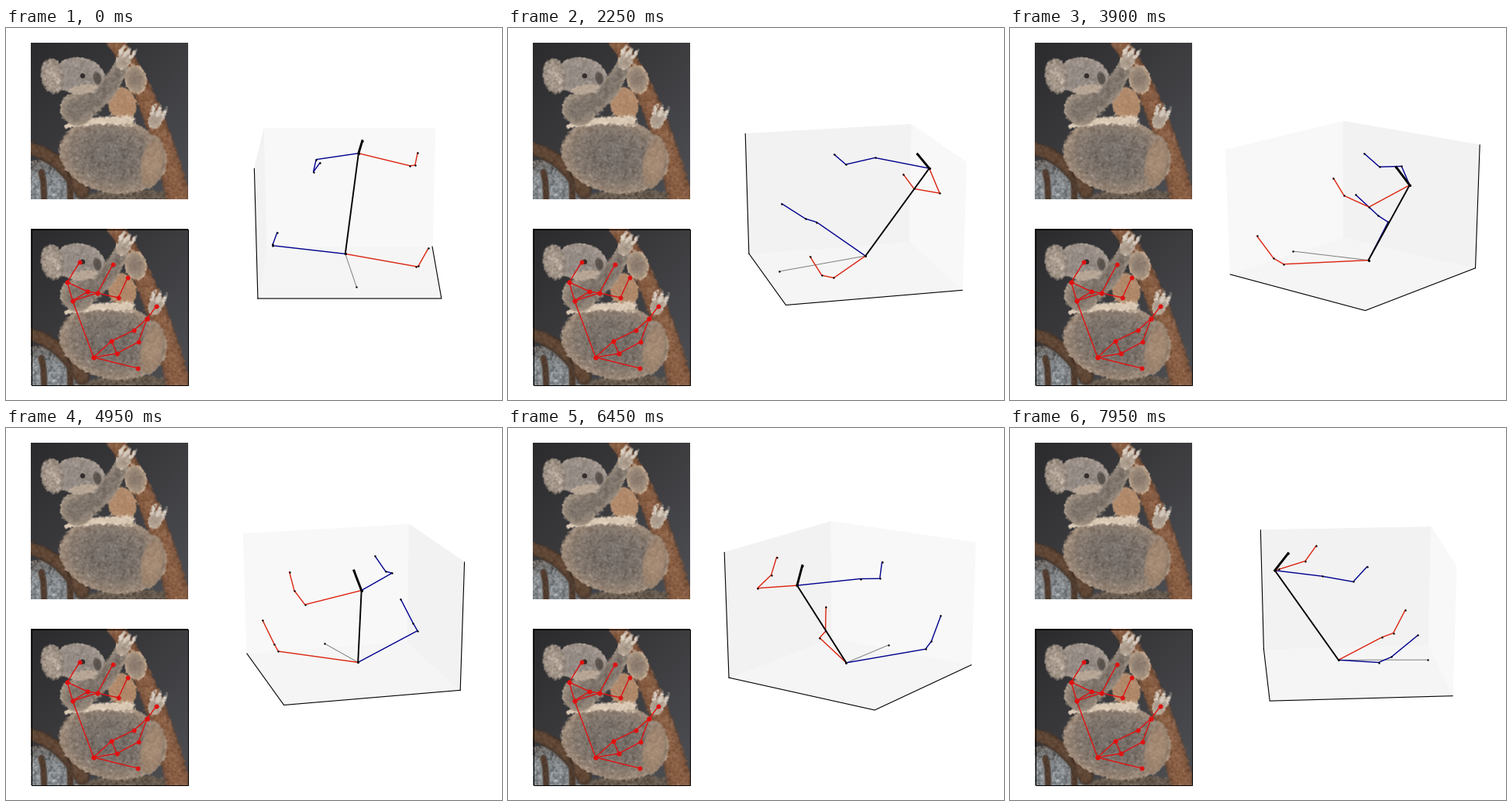
A matplotlib script for the animation above (8000 ms loop, 640x480 px).

```python
import numpy as np
import matplotlib.pyplot as plt
from matplotlib.animation import FuncAnimation

WIDTH, HEIGHT, DPI = 640, 480, 100
INTERVAL, FRAMES, HOLD = 50, 160, 3
STEP_DEG = 5
PT = 72 / DPI  # points per pixel

fig = plt.figure(figsize=(WIDTH / DPI, HEIGHT / DPI), dpi=DPI, facecolor="white")
ax = fig.add_axes([0, 0, 1, 1])
ax.axis("off")

# ---------------------------------------------------------------- photo
LEFT, TOP, SIDE_X, SIDE_Y = 32, 19, 203, 202
LOWER = 240  # offset of the annotated copy
rng = np.random.default_rng(4)
Y, X = np.mgrid[0:SIDE_Y, 0:SIDE_X] + 0.5
X, Y = X + LEFT, Y + TOP


def rgb(color):
    return np.array([int(color[i:i + 2], 16) for i in (1, 3, 5)]) / 255


def mix(a, b, t):
    return rgb(a) + (rgb(b) - rgb(a)) * np.clip(t, 0, 1)[..., None]


def soften(a):
    for axis in (0, 1):
        a = (np.roll(a, 1, axis) + 2 * a + np.roll(a, -1, axis)) / 4
    return a


fine = soften(rng.normal(0, 1, X.shape))
fur = fine + 2 * soften(soften(fine))


def lay(photo, d, size, core, rim, grain):
    """Blend in a furry shape; d runs from 0 at its middle to 1 at its edge."""
    mask = np.clip((1 - d) * size / 2 + 0.5 + 0.25 * fur, 0, 1)[..., None]
    tone = mix(core, rim, d ** 3) + grain * fur[..., None]
    photo[:] = photo * (1 - mask) + tone * mask


def oval(photo, x, y, rx, ry, tilt, core, rim=None, grain=0.02):
    c, s = np.cos(np.radians(tilt)), np.sin(np.radians(tilt))
    dx, dy = X - x, Y - y
    d = np.hypot((c * dx + s * dy) / rx, (c * dy - s * dx) / ry)
    lay(photo, d, min(rx, ry), core, rim or core, grain)


def limb(photo, start, bend, end, r0, r1, core, rim=None, grain=0.02):
    """A tapering stroke along a quadratic curve."""
    d = np.full(X.shape, np.inf)
    for t in np.linspace(0, 1, 50):
        x, y = ((1 - t) ** 2 * a + 2 * t * (1 - t) * b + t * t * c
                for a, b, c in zip(start, bend, end))
        d = np.minimum(d, np.hypot(X - x, Y - y) / (r0 + (r1 - r0) * t))
    lay(photo, d, min(r0, r1), core, rim or core, grain)


def paw(photo, x, y, tilt):
    oval(photo, x, y, 9, 13, tilt, "#a99a8b", "#c3b4a4")
    for k in range(3):
        oval(photo, x + 7 * k - 3, y - 13 + 3 * k, 2.5, 7, tilt, "#d3c8bc")


def make_photo():
    p = mix("#2b2a2c", "#4b4c50", (X + Y - LEFT - TOP) / 360)
    # ground, branches and trunk
    oval(p, 50, 212, 55, 42, 0, "#868b8f", "#5c5550", 0.07)
    oval(p, 160, 222, 60, 14, 0, "#665a4e", grain=0.04)
    limb(p, (20, 154), (66, 158), (98, 210), 8, 10, "#624937", "#423228")
    for x in (46, 80):
        limb(p, (x, 186), (x + 4, 205), (x + 3, 230), 4, 4, "#503c2f")
    limb(p, (138, 14), (190, 85), (225, 230), 10, 16, "#8a6045", "#6b4a37", 0.03)
    # body, from the far arm to the near one
    oval(p, 167, 66, 14, 19, -15, "#8d7d70", "#c0a890")
    oval(p, 150, 98, 18, 22, -20, "#b08a6b")
    oval(p, 138, 165, 70, 48, 10, "#776f69", "#a18d7b", 0.035)
    oval(p, 189, 174, 15, 34, 10, "#a58a73", "#94806f")
    limb(p, (78, 127), (110, 117), (160, 120), 3, 6, "#d9c8b4")
    oval(p, 92, 104, 22, 22, 0, "#82776c", "#a39584", 0.03)
    limb(p, (90, 106), (132, 90), (150, 45), 18, 9, "#7d736a", "#a09182", 0.03)
    paw(p, 152, 42, 35)
    paw(p, 193, 118, 20)
    # head
    oval(p, 94, 62, 33, 24, 5, "#938a84", "#a0958c", 0.03)
    oval(p, 60, 62, 15, 23, -10, "#ab9d90", "#8d8177", 0.05)
    oval(p, 100, 79, 18, 6, -10, "#b6a594")
    oval(p, 118, 65, 5, 8, -15, "#5a524d")
    oval(p, 99, 62, 3, 3, 0, "#2c2624")
    return np.clip(p, 0, 1)


picture = make_photo()
for top in (TOP, TOP + LOWER):
    ax.imshow(picture, extent=(LEFT, LEFT + SIDE_X, top + SIDE_Y, top),
              interpolation="nearest", aspect="auto", zorder=1)
ax.set(xlim=(0, WIDTH), ylim=(HEIGHT, 0))
ax.add_patch(plt.Rectangle((LEFT + 0.5, TOP + LOWER + 0.5), SIDE_X - 1, SIDE_Y - 1,
                           fill=False, lw=PT, zorder=2))

KEYPOINTS = dict(
    nose=(95, 302), cheek=(79, 328), chest=(86, 352), collar=(105, 340),
    shoulder=(118, 342), wrist=(138, 305), elbow=(145, 348), hand=(157, 322),
    root=(113, 425), hip=(136, 404), hip2=(143, 420), knee=(165, 390),
    ankle=(182, 375), toe=(194, 359), knee2=(171, 405), tail=(170, 439))
LINKS = ("nose cheek chest root hip knee ankle toe", "cheek collar chest shoulder wrist",
         "collar shoulder elbow hand", "root hip2 knee2 ankle", "hip hip2", "root tail")
for link in LINKS:
    x, y = zip(*(KEYPOINTS[name] for name in link.split()))
    ax.plot(x, y, color="#e01212", lw=1.4 * PT, marker="o", ms=6 * PT, mew=0, zorder=3)

# ---------------------------------------------------------------- 3D view
HALF, HALF_Z = 0.595, 0.446


def project(points, step):
    """Perspective view of (right, front, up) points turned by the step."""
    u, v, z = np.array(points, float).T
    a = np.radians(STEP_DEG * step)
    x = u * np.cos(a) - v * np.sin(a)
    near = v * np.cos(a) + u * np.sin(a)
    w = 1 - 0.09 * near - 0.04 * z
    return np.column_stack([443.4 + 192 * x / w, 235.4 - (179 * z - 50 * near) / w])


def corner(i, up):
    a = np.radians(45 + 90 * i)
    r = HALF * np.sqrt(2)
    return r * np.sin(a), r * np.cos(a), HALF_Z if up else -HALF_Z


ROOT, NECK = (-0.03, -0.106, -0.35), (0.062, -0.521, 0.281)
RED, BLUE = "#dc2410", "#00008f"
# points, colour, width in px
CHAINS = [
    ([ROOT, (0.045, 0.518, -0.39)], "#808080", 1.0),
    ([ROOT, (-0.518, 0.117, -0.22), (-0.511, 0.2, -0.186), (-0.472, 0.376, -0.05)],
     BLUE, 1.4),
    ([ROOT, (0.444, 0.239, -0.334), (0.453, 0.322, -0.306), (0.513, 0.413, -0.148)],
     RED, 1.4),
    ([NECK, (-0.227, -0.226, 0.307), (-0.242, -0.024, 0.268), (-0.195, 0.07, 0.357)],
     BLUE, 1.4),
    ([NECK, (0.421, -0.479, 0.199), (0.447, -0.296, 0.249), (0.459, -0.218, 0.357)],
     RED, 1.4),
    ([ROOT, NECK], "black", 1.9),
    ([NECK, (0.087, -0.429, 0.393)], "black", 2.9),
]

floor, wall_l, wall_r = (ax.fill([0, 0, 0], [0, 0, 0], lw=0.6, zorder=1)[0]
                         for _ in range(3))
floor.set_color("#f5f5f5")
base_line, post_line = (ax.plot([], [], color="black", lw=1.1 * PT, zorder=2)[0]
                        for _ in range(2))
limbs = [ax.plot([], [], color=color, lw=width * PT, marker="o", ms=2.4 * PT,
                 mfc="black", mew=0, zorder=4 + k)[0]
         for k, (_, color, width) in enumerate(CHAINS)]


def update(i):
    step = i // HOLD
    near = step * STEP_DEG // 90  # index of the box corner closest to the viewer
    left, right, far = near - 1, near + 1, near + 2
    even = near % 2 == 0

    def wall(a, b):
        return project([corner(a, 0), corner(b, 0), corner(b, 1), corner(a, 1)], step)

    floor.set_xy(project([corner(k, 0) for k in range(4)], step))
    wall_l.set_xy(wall(left, far))
    wall_r.set_xy(wall(far, right))
    wall_l.set_color("#f2f2f2" if even else "#f8f8f8")
    wall_r.set_color("#f8f8f8" if even else "#f2f2f2")
    base_line.set_data(*project([corner(k, 0) for k in (left, near, right)], step).T)
    post = left if even else right
    post_line.set_data(*project([corner(post, 0), corner(post, 1)], step).T)
    for line, (points, _, _) in zip(limbs, CHAINS):
        line.set_data(*project(points, step).T)
    return [floor, wall_l, wall_r, base_line, post_line, *limbs]


anim = FuncAnimation(fig, update, frames=FRAMES, interval=INTERVAL, repeat=True)
plt.show()
```
